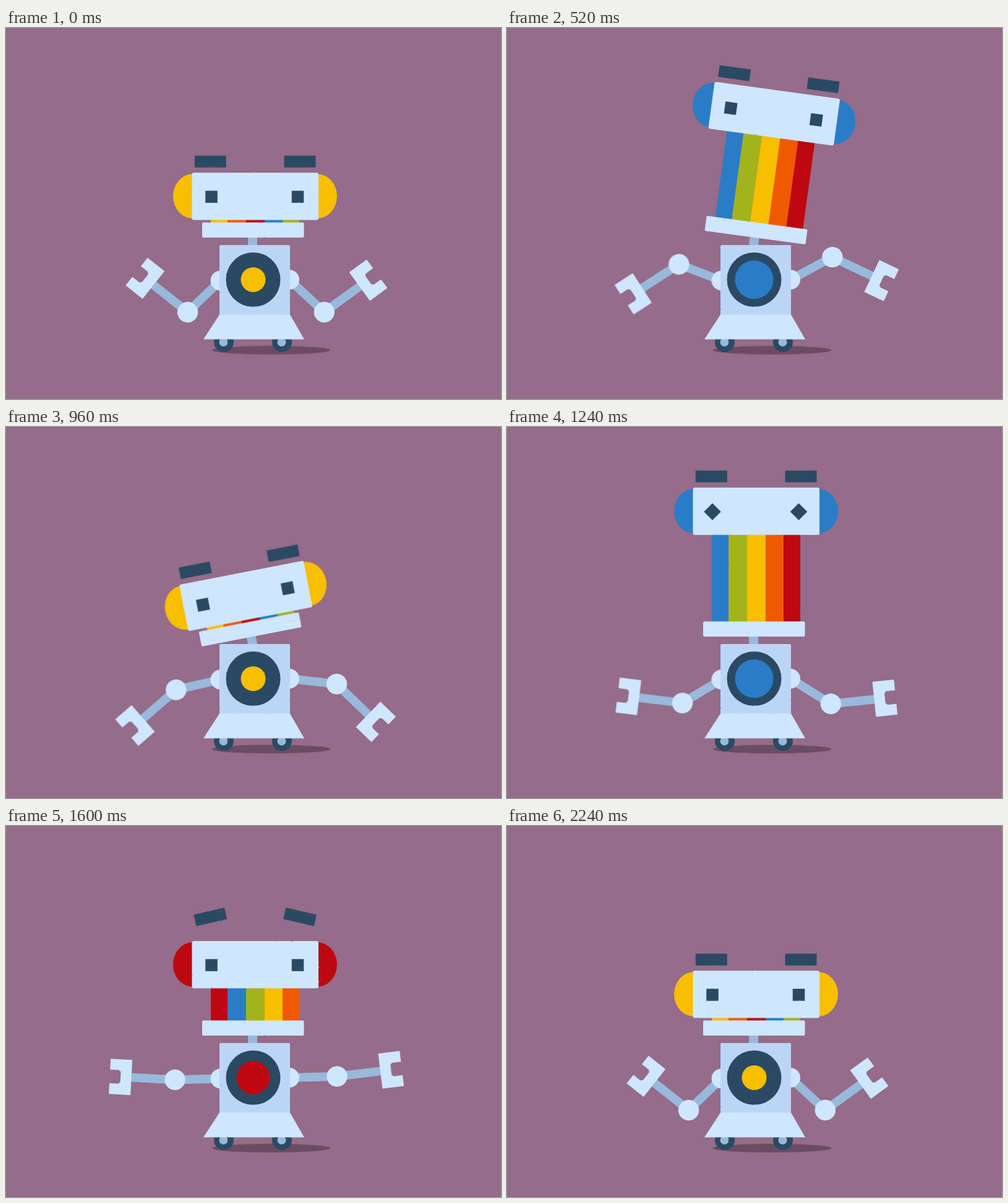
Write an HTML page that moves like this. It is 800x600 px and loops after 2280 ms.

```html
<!DOCTYPE html>
<html lang="en">
<head>
<meta charset="utf-8">
<title>Rainbow robot</title>
<style>
html, body { margin: 0; width: 100%; height: 100%; overflow: hidden; background: #956c89; }
svg { display: block; width: 800px; height: 600px; }
</style>
</head>
<body>
<svg viewBox="0 0 800 600">
  <filter id="rough" filterUnits="userSpaceOnUse" x="0" y="0" width="800" height="600" color-interpolation-filters="sRGB">
    <feTurbulence type="fractalNoise" baseFrequency=".25" numOctaves="2" seed="4"/>
    <feDisplacementMap in="SourceGraphic" scale="1.6" xChannelSelector="R" yChannelSelector="G"/>
  </filter>
  <g id="robot" filter="url(#rough)"></g>
</svg>
<script>
const STEP = 40, FRAMES = 57;
const LIGHT = '#cfe6ff', BODY = '#bcd5f7', STEEL = '#98b9dc', DARK = '#2a4a63';
const RAINBOW = ['#2a7cc7', '#a3b41a', '#f8be00', '#f15900', '#bd0811'];
const EDGES = [331, 358, 388, 418, 447, 474];

// Each mouth: first stripe colour, opening, brow lift, brow turn, heart radius
const MOUTHS = {
  shut:  { first: 2, gap: 4,   lift: 0,  turn: 0,  heart: 20 },
  wide:  { first: 1, gap: 182, lift: 0,  turn: 0,  heart: 33 },
  open:  { first: 0, gap: 140, lift: 0,  turn: 0,  heart: 31 },
  half:  { first: 4, gap: 52,  lift: 21, turn: 13, heart: 27 },
  small: { first: 3, gap: 34,  lift: 21, turn: 13, heart: 24 }
};
const SPEECH = [[0, 'shut'], [4, 'wide'], [7, 'open'], [16, 'half'], [21, 'small'], [23, 'shut'],
  [29, 'wide'], [31, 'open'], [38, 'half'], [42, 'small'], [45, 'shut']];

// Arm angles below the horizontal
const LEFT_UPPER = [[0, 44], [8, 1.5], [18, -33], [24, 13], [31, 31], [39, 1.5], [41, 1.5], [55, 44]];
const LEFT_FORE = [[0, -38.5], [8, -3], [18, 56], [24, 41], [31, -7], [39, -3], [41, -3], [55, -38.5]];
const RIGHT_UPPER = [[0, 43], [8, -1.5], [18, -43], [24, 6.5], [31, 32], [39, -1.5], [41, -1.5], [55, 43]];
const RIGHT_FORE = [[0, -36], [8, -7], [18, 47], [24, 44], [31, -6], [39, -7], [41, -7], [55, -36]];
const TILT = [[0, 0], [10, 0], [15, 12], [18, 12], [24, -11], [30, 0]];
const EYES = [[0, 0], [15, 0], [21, 90], [28, 90], [34, 180]];

// Smooth curve through the keys that stops at each turning point
function curve(keys, t) {
  const last = keys.length - 1;
  if (t >= keys[last][0]) return keys[last][1];
  const i = keys.findIndex(k => k[0] > t) - 1;
  const rise = n => (keys[n + 1][1] - keys[n][1]) / (keys[n + 1][0] - keys[n][0]);
  const slope = n => {
    if (n < 1 || n >= last) return 0;
    const a = rise(n - 1), b = rise(n);
    return a * b > 0 ? 2 * a * b / (a + b) : 0;
  };
  const [t0, v0] = keys[i], [t1, v1] = keys[i + 1], d = t1 - t0, x = (t - t0) / d;
  const s = x * x * (3 - 2 * x);
  return v0 + (v1 - v0) * s + d * x * (1 - x) * ((1 - x) * slope(i) - x * slope(i + 1));
}

const rect = (x, y, w, h, fill, extra = '') =>
  `<rect x="${x}" y="${y}" width="${w}" height="${h}" fill="${fill}" ${extra}/>`;
const circle = (x, y, r, fill) => `<circle cx="${x}" cy="${y}" r="${r}" fill="${fill}"/>`;
const path = (d, fill) => `<path d="${d}" fill="${fill}"/>`;
const group = (transform, content) => `<g transform="${transform}">${content}</g>`;
const block = (x, y, w, h, turn) =>
  group(`translate(${x} ${y}) rotate(${turn})`, rect(-w / 2, -h / 2, w, h, DARK));

function arm(x, y, side, length, upper, fore) {
  const hand = path('M70.5-28.5H105.5V-11H91L88-8V8L91 11H105.5V28.5H70.5Z', LIGHT);
  const lower = rect(0, -7, 73, 14, STEEL) + hand + circle(0, 0, 16.7, LIGHT);
  return group(`translate(${x} ${y}) scale(${side} 1)`,
    group(`rotate(${upper})`, rect(0, -7, length, 14, STEEL) +
      group(`translate(${length} 0) rotate(${fore - upper})`, lower)) +
    circle(0, 0, 16, LIGHT));
}

function head(m, tilt, eye) {
  const top = 238 - m.gap, color = RAINBOW[m.first], brow = top - 18 - m.lift;
  let s = rect(391, 335, 15, 22, STEEL);
  for (let i = 0; i < 5; i++)
    s += rect(EDGES[i], 313 - m.gap, EDGES[i + 1] - EDGES[i], m.gap + 3, RAINBOW[(m.first + i) % 5]);
  s += path(`M302 ${top + 2}A32 36 0 0 0 302 ${top + 74}Z`, color);
  s += path(`M503 ${top + 2}A32 36 0 0 1 503 ${top + 74}Z`, color);
  s += rect(300.5, top, 204.5, 76.5, LIGHT, 'rx="3"') + rect(317, 314.5, 164.5, 24.5, LIGHT, 'rx="2"');
  s += block(332, top + 39, 19.5, 19.5, eye) + block(471.5, top + 39, 19.5, 19.5, eye);
  s += block(330.3, brow, 51, 19, -m.turn) + block(475, brow, 51, 19, m.turn);
  return group(`rotate(${tilt} 400 351)`, s);
}

const wheel = x => circle(x, 508, 16, DARK) + circle(x - .5, 508, 7, STEEL);

function scene(f) {
  const m = MOUTHS[SPEECH.filter(k => k[0] <= f).pop()[1]];
  return '<ellipse cx="428.5" cy="521" rx="96" ry="7" fill="#6b4c63"/>' +
    wheel(352) + wheel(446) +
    head(m, curve(TILT, f), curve(EYES, f)) +
    arm(346.5, 408.5, -1, 73.5, curve(LEFT_UPPER, f), curve(LEFT_FORE, f)) +
    arm(458, 407, 1, 77, curve(RIGHT_UPPER, f), curve(RIGHT_FORE, f)) +
    rect(345, 351, 114, 114, BODY, 'rx="2"') +
    path('M345 463.5H459L482 503.5H319Z', LIGHT) +
    circle(399.5, 407, 44, DARK) + circle(399.5, 407, m.heart, RAINBOW[m.first]);
}

const robot = document.getElementById('robot'), start = performance.now();
let shown = -1;
function draw() {
  const f = Math.floor((performance.now() - start) / STEP) % FRAMES;
  if (f !== shown) robot.innerHTML = scene(shown = f);
  requestAnimationFrame(draw);
}
draw();
</script>
</body>
</html>
```
